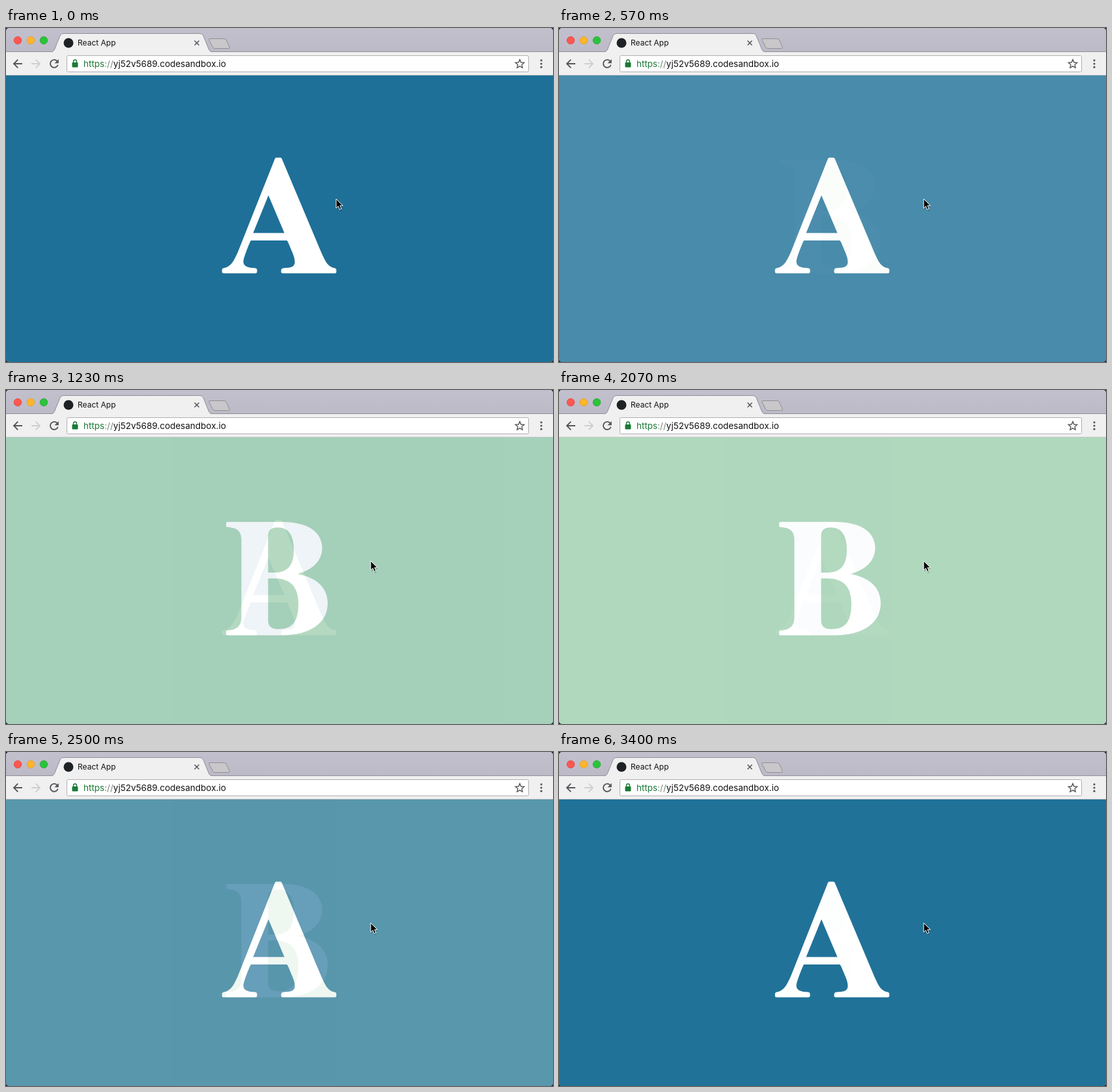
Recreate the animation shown at these times as an HTML page. Size 840 by 514 pixels, loop 3430 ms.

```html
<!DOCTYPE html>
<html lang="en">
<head>
<meta charset="utf-8">
<title>Letter cross-fade</title>
<style>
  html, body { margin: 0; width: 100%; height: 100%; overflow: hidden; background: #15202e; }
  #stage { position: relative; width: 840px; height: 514px; overflow: hidden; border-radius: 5px; background: #fff; }
  svg { position: absolute; left: 0; top: 0; display: block; }
  .page { position: absolute; inset: 0; }
  #a { background: #1e7098; }
  #b { background: #a9d5b7; }
  .page path { fill: #fff; fill-rule: evenodd; }
  #chrome, #cursor { z-index: 3; }
  text { font-family: Inter, Roboto, sans-serif; fill: #111; }
</style>
</head>
<body>
<div id="stage">
  <div class="page" id="a">
    <svg width="840" height="514" role="img" aria-label="A">
      <path d="M415 199.5H421.5Q422.8 199.5 423.5 201L484 345C491 361 495 368 505 369.5Q507.3 370 507.3 372V375.5Q507.3 377.5 505 377.5H425Q422.5 377.5 422.5 375V373Q422.5 370.2 425 369.7C433 368.5 443.5 370 443.5 360C443.5 353 440 346 436 336.5Q433.5 330 431.5 327H376Q374 330.5 370 341C367 349 364.5 356 364.5 360C365 368 374 369 383 369.5Q385.5 370 385.5 372V375.5Q385.5 377.5 383 377.5H334Q331.7 377.5 331.7 375.5V372Q331.7 370 334 369.5C344 368 349 361 356 345L413 201Q413.7 199.5 415 199.5ZM403 257.5L379.5 315.5H427.5Z"/>
    </svg>
  </div>
  <div class="page" id="b">
    <svg width="840" height="514" role="img" aria-label="B">
      <path d="M340 203H424C464 203 485.5 219 485.5 243C485.5 263 471 276.5 448 283C477 289 494 304 494 328C494 358 468 377.5 423 377.5H340Q338 377.5 338 375.5V372Q338 370 340 370C354 369 361.5 364 361.5 349V231C361.5 216 354 212 340 211Q338 210.5 338 209V205Q338 203 340 203ZM402.5 281V226C402.5 216 407 211.5 417 211.5C434 211.5 442 224 442 246C442 270 432 281 412 281ZM402.5 290H412C437 290 449 303 449 329C449 356 440 368 418 368C407 368 402.5 363.5 402.5 354Z"/>
    </svg>
  </div>

  <svg id="chrome" width="840" height="73">
    <defs>
      <linearGradient id="bar" x2="0" y2="1">
        <stop stop-color="#c3c0ce"/><stop offset="1" stop-color="#bdbac7"/>
      </linearGradient>
    </defs>
    <rect width="840" height="37" fill="url(#bar)"/>
    <rect y="36" width="840" height="1" fill="#918f98"/>
    <rect y="37" width="840" height="36" fill="#f1f0f1"/>
    <rect y="72" width="840" height="1" fill="#c9c8ca"/>

    <g stroke-width=".8">
      <circle cx="18" cy="19" r="5.8" fill="#fc5750" stroke="#e0443e"/>
      <circle cx="38" cy="19" r="5.8" fill="#fdb52b" stroke="#dfa023"/>
      <circle cx="58" cy="19" r="5.8" fill="#2bc33b" stroke="#1ea82c"/>
    </g>

    <path d="M70 37Q73 36.5 74.5 33L83 12Q84.5 8.5 88 8.5H298Q301.5 8.5 303 12L311.5 33Q313 36.5 316 37Z" fill="#f1f0f1"/>
    <path d="M70 36.5Q73 36.5 74.5 33L83 12Q84.5 8.5 88 8.5H298Q301.5 8.5 303 12L311.5 33Q313 36.5 316 36.5" fill="none" stroke="#8f8d96"/>
    <circle cx="96" cy="23" r="7.5" fill="#1e2224"/>
    <text x="110" y="27" font-size="12">React App</text>
    <path d="M289.5 19.5l7 7m0-7l-7 7" stroke="#55545a" stroke-width="1.5"/>
    <path d="M313 16.5H335Q337.5 16.5 338.5 19L343 29Q344 31.5 341.5 31.5H321Q318.5 31.5 317.5 29.5L312 19Q310.8 16.5 313 16.5Z" fill="#c9c7c9" stroke="#918f97"/>

    <g fill="none" stroke="#55555a" stroke-width="1.9">
      <path d="M25 55H12.5M18.3 48.7L12 55L18.3 61.3"/>
      <path d="M39 55H51.5M45.7 48.7L52 55L45.7 61.3" stroke="#cfced0"/>
      <path d="M78.6 51A6 6 0 1 0 79.7 56.8"/>
    </g>
    <path d="M80.8 48V54.3H74.5Z" fill="#55555a"/>

    <rect x="93.5" y="42.5" width="709" height="25" rx="2" fill="#fff" stroke="#aeadb0"/>
    <rect x="101.5" y="53" width="9" height="7.5" rx="1" fill="#1a7a35"/>
    <path d="M103.5 53.5V51.5a2.5 2.5 0 0 1 5 0V53.5" fill="none" stroke="#1a7a35" stroke-width="1.4"/>
    <text x="119" y="60" font-size="13.5"><tspan fill="#1a7a35">https</tspan><tspan fill="#75857a">://</tspan>yj52v5689.codesandbox.io</text>
    <path d="M789 48.6L790.9 53L795.7 53.4L792.1 56.6L793.1 61.2L789 58.8L784.9 61.2L785.9 56.6L782.3 53.4L787.1 53Z" fill="none" stroke="#55555a" stroke-width="1.4"/>
    <g fill="#55555a">
      <circle cx="822" cy="49.8" r="1.6"/><circle cx="822" cy="55" r="1.6"/><circle cx="822" cy="60.2" r="1.6"/>
    </g>
  </svg>

  <svg id="cursor" width="16" height="22">
    <path d="M1.5 2V16.3L4.8 13.2L7 18.4L9.6 17.3L7.4 12.3H11.8Z" fill="#000" opacity=".25" transform="translate(.4 1.2)"/>
    <path d="M1 1V15.3L4.3 12.2L6.5 17.4L9.1 16.3L6.9 11.3H11.3Z" fill="#000" stroke="#fff" stroke-width="1"/>
  </svg>
</div>
<script>
  const LOOP = 3430, STEP = 100 / 3;
  const TO_B = 485, TO_A = 2015, MOVE = 380;
  const [a, b, cursor] = ['a', 'b', 'cursor'].map(id => document.getElementById(id));

  // Overdamped spring falling from 1 to 0
  function spring(ms) {
    const s = Math.max(0, ms) / 1000;
    return 1.07 * Math.exp(-3.65 * s) - 0.07 * Math.exp(-56 * s);
  }

  // The leaving page lies above the entering one
  function fade(leaving, entering, ms) {
    const v = spring(ms);
    leaving.style.opacity = v;
    leaving.style.zIndex = 2;
    entering.style.opacity = 1 - v;
    entering.style.zIndex = 1;
  }

  function draw(now) {
    const t = Math.floor((now % LOOP + 4) / STEP) * STEP;
    if (t < TO_A) fade(a, b, t - TO_B);
    else fade(b, a, t - TO_A);
    const p = Math.min(1, t / MOVE);
    const x = 506 + 53 * (1 - Math.cos(Math.PI * p)) / 2;
    cursor.style.transform = `translate(${x}px, 262px)`;
  }

  const start = performance.now();
  function tick() {
    draw(performance.now() - start);
    requestAnimationFrame(tick);
  }
  tick();
</script>
</body>
</html>
```
